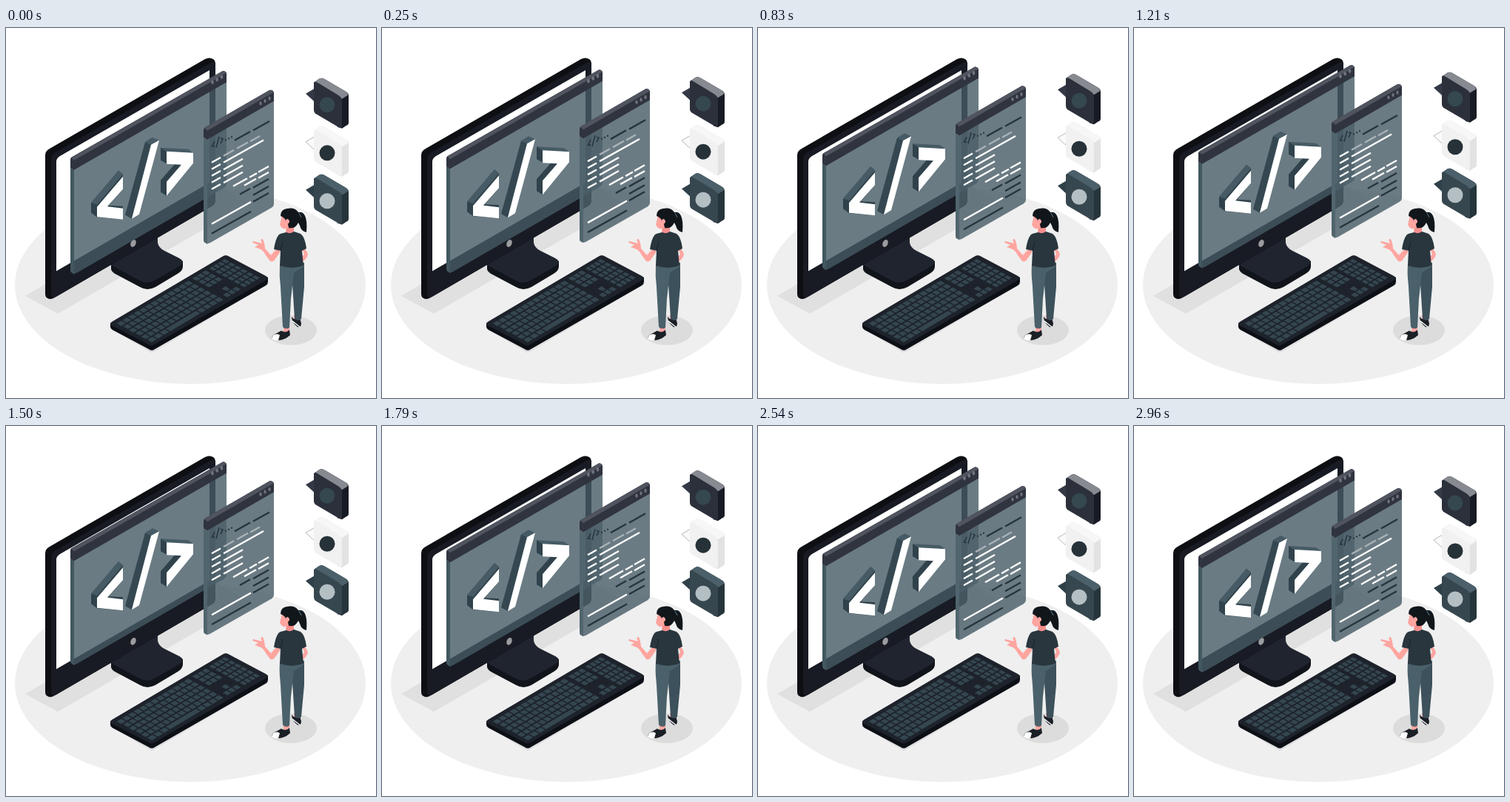
An HTML page that plays this animation: 500x500 px, repeating every 3 s.

```html
<!DOCTYPE html>
<html lang="en">
<head>
<meta charset="utf-8">
<title>Isometric workstation</title>
<style>
  html, body { margin: 0; width: 100%; height: 100%; overflow: hidden; background: #fff; }
  svg { display: block; width: 100vw; height: 100vh; }
  .line { fill: none; stroke-linecap: butt; }
</style>
</head>
<body>
<svg viewBox="0 0 500 500">
  <!-- floor and shadows -->
  <ellipse cx="249" cy="347.5" rx="237" ry="133.5" fill="#efefef"/>
  <path d="M26 362 70 386 328 237 284 212Z" fill="#e0e0e0"/>
  <ellipse cx="385" cy="408.5" rx="35" ry="20" fill="#dcdcdc"/>

  <!-- stand -->
  <path d="M142 318V326Q143 330 149 333L181 350Q191 356 202 350L232 332Q239 328 239 322V315L190 300Z" fill="#11141b"/>
  <path d="M145 314 170 299 205 279V290Q206 297 214 301L234 311Q243 316 234 322L201 341Q191 347 180 341L147 323Q139 319 145 314Z" fill="#20242f"/>

  <!-- monitor -->
  <path d="M53 172Q53 166 59 163L269 42Q275 39 280 42 283 44 283 49V233Q283 238 278 241L66 364Q60 368 56 365 53 364 53 359Z" fill="#0d0f13"/>
  <path d="M61 177Q61 171 67 168L276 47Q283 43 283 51V233Q283 238 278 241L68 363Q61 367 61 359Z" fill="#181b23"/>
  <path d="M68 181Q68 176 73 173L275 57V209L68 328.500Z" fill="#fff"/>
  <ellipse cx="172" cy="291" rx="3.500" ry="5.200" transform="rotate(22 172 291)" fill="#9a9c9f"/>

  <!-- keyboard -->
  <path d="M143 407 197 439 355 346 350 336Z" fill="#dedede"/>
  <path d="M141 399V404Q141 406 144 408L193 434Q197 437 201 434L351 348Q354 346 354 343V337L297 320Z" fill="#0d1016"/>
  <path d="M143 397 293 308.500Q297 306 301 308.500L351 335Q356 338 351 341L201 427.500Q197 430 193 428L143 402Q139 400 143 397Z" fill="#1d222b"/>
  <g id="keys" transform="matrix(156 -93 56 30 141 400)" fill="#34464f"/>

  <!-- person -->
  <g>
    <path d="M375 400H383V411H375ZM389 388H398V396H389Z" fill="#ffa5a0"/>
    <path d="M386 390Q390 396 397 392L399 399Q399 405 394 404 386 398 386 390Z" fill="#1b2026"/>
    <path d="M387 396 397 404" stroke="#fff" stroke-width="1.500"/>
    <path d="M372 409Q378 413 383 408L384 415Q380 419 374 421 368 423 361 421 358 419 361 415Z" fill="#1b2026"/>
    <path d="M361 415Q367 412 370 415L368 422Q362 423 359 420Z" fill="#fff"/>
    <path d="M385 325 387 346 390 393Q395 397 399 393L403 350V317Z" fill="#3c515b"/>
    <path d="M370 319Q369 335 371 350L374 404Q378 408 383 405L385 366 389 331 403 322V317Z" fill="#4a616b"/>
    <path d="M399 295Q407 300 408 306 407 311 402 315L398 311 403 306Z" fill="#ffa5a0"/>
    <path d="M366 298 358 307 350 298Q350 293 347 285L344 286 346 291 334 288 333 290 341 293 336 296 344 299Q348 301 351 307L357 315Q361 317 364 312L371 302Z" fill="#ffa5a0"/>
    <path d="M379 267H389V277Q384 281 378 277Z" fill="#f58f8d"/>
    <path d="M379 276Q384 279 389 275L398 278Q404 282 406 298L400 301 402 321Q386 327 370 321L371 301Q366 300 362 299 365 280 371 278Z" fill="#29363e"/>
    <path d="M371 301 374 288" stroke="#19242b" stroke-width="1" class="line"/>
    <path d="M373 253 370 266 372 269 374 271Q380 272 385 267L387 252Z" fill="#ffa5a0"/>
    <path d="M371 254Q371 245 380 244 390 242 395 249L399 249Q408 252 406 276 399 275 397 267L395 263Q391 272 382 270L381 265Q384 261 381 258 378 258 378 261 378 257 371 254Z" fill="#11161b"/>
    <path d="M396 250 399 256" stroke="#455a64" stroke-width="1.500"/>
    <circle cx="380.500" cy="261.500" r="2.500" fill="#ffa5a0"/>
  </g>

  <g id="floating">
    <!-- large panel -->
    <g>
      <path d="M91 178 298 61V211Q298 214 295 216L96 331 91 333Z" fill="#455a64" opacity=".8"/>
      <path d="M87 189 92 191V333L89 331Q87 330 87 328Z" fill="#435760"/>
      <path d="M87 178Q87 175 90 174L293 58.300Q296 57.500 298 61V73.500L92 192 87 189Z" fill="#30343f"/>
      <path d="M88 175.500 293 58.300Q296 58 298 61L92 179Z" fill="#50545f"/>
      <g class="dots" fill="#70747e">
        <ellipse cx="279" cy="73.500" rx="1.800" ry="2.800"/><ellipse cx="285.200" cy="70" rx="1.800" ry="2.800"/><ellipse cx="291.500" cy="66.500" rx="1.800" ry="2.800"/>
      </g>
      <path d="M152 193 158 198V218L139 240 158 241V259L123 256 115 250V237Z" fill="#30424b"/>
      <path d="M152 193 158 198 123 239 115 236Z" fill="#465b65"/>
      <path d="M158 201 123 242V255.500L158 259V244L137 241.500 158 218Z" fill="#fff"/>
      <path d="M188 154 197 158 170 258 161 253Z" fill="#354851"/>
      <path d="M188 154 198 148 207 152 196 158Z" fill="#465b65"/>
      <path d="M196 158 207 152 180 252 170 258Z" fill="#fff"/>
      <path d="M209 162 218 167V184L209 179ZM209 206 229 183 237 185 217 209V227L209 222Z" fill="#30424b"/>
      <path d="M209 162 246 164 253 169 218 168Z" fill="#465b65"/>
      <path d="M217 167 253 169V183L217 227V208L237 185 217 184Z" fill="#fff"/>
    </g>

    <!-- code window -->
    <g>
      <path d="M271 139 362 87V238Q362 241 359 243L275 291 271 292Z" fill="#4d616a" opacity=".83"/>
      <path d="M267 149 272 151V292L269 290.500Q267 290 267 287Z" fill="#51656e"/>
      <path d="M267 138Q267 135.500 270 134L356 84.300Q360 83 362 87V99L272 151 267 148Z" fill="#30343f"/>
      <path d="M268 135 356 84.300Q360 83 362 87L272 139Z" fill="#50545f"/>
      <g fill="#70747e">
        <ellipse cx="344" cy="102" rx="1.600" ry="2.600"/><ellipse cx="350" cy="98.700" rx="1.600" ry="2.600"/><ellipse cx="356" cy="95.300" rx="1.600" ry="2.600"/>
      </g>
      <path d="M282 153 278.500 160 282 160M288 147 284 162M290 149 293 150 290 156" class="line" stroke="#26343c" stroke-width="1.500"/>
      <path d="M297 152.500V150.500M301 150.500V148.500M305 148.500V146.500" class="line" stroke="#26343c" stroke-width="2"/>
      <g id="code" class="line" stroke-width="2.300"/>
    </g>
    <g id="badges"/>
  </g>
</svg>
<script>
const NS = "http://www.w3.org/2000/svg";
const byId = id => document.getElementById(id);

function add(parent, tag, attrs) {
  const node = parent.appendChild(document.createElementNS(NS, tag));
  for (const name in attrs) node.setAttribute(name, attrs[name]);
  return node;
}

function keyRow(row, start, end, count) {
  const step = (end - start) / count;
  for (let i = 0; i < count; i++) {
    add(byId("keys"), "rect", {
      x: start + i * step, y: 0.07 + row * 0.147, width: step - 0.009, height: 0.112
    });
  }
}

for (let row = 0; row < 6; row++) {
  if (row === 5) {
    keyRow(row, 0.03, 0.19, 3);
    keyRow(row, 0.19, 0.46, 1);
    keyRow(row, 0.46, 0.66, 4);
  } else {
    keyRow(row, 0.03 + (row % 2) * 0.004, 0.66, row ? 14 : 13);
  }
  if (row < 3 || row === 5) keyRow(row, 0.685, 0.81, 3);
  if (row === 4) keyRow(row, 0.727, 0.769, 1);
  keyRow(row, 0.83, 0.975, 4);
}

// Each code line rises along the isometric axis: [x1, y1, x2].
function codeLines(color, lines) {
  for (const [x1, y1, x2] of lines) {
    add(byId("code"), "path", { d: `M${x1} ${y1}L${x2} ${y1 - (x2 - x1) * 0.56}`, stroke: color });
  }
}
codeLines("#26343c", [[309, 152, 330], [334, 138.5, 356], [316, 225, 330], [334, 216, 355],
  [334, 226, 355], [334, 235, 355], [278, 278, 331]]);
codeLines("#aab3b7", [[294, 173, 308], [312, 163, 327], [330, 153.500, 343]]);
codeLines("#fff", [[278, 182, 290], [278, 191, 290], [278, 200, 290], [278, 209, 290], [278, 218, 290],
  [294, 182, 348], [294, 191.500, 320], [294, 200.500, 320], [294, 209.500, 320],
  [307, 214, 326], [329, 202, 339], [341, 195, 355], [322, 213, 338], [341, 203, 355], [278, 265, 331]]);

function badge(y, front, top, side, tail, mark, edge) {
  const g = add(byId("badges"), "g", { transform: `translate(0 ${y})` });
  add(g, "path", { d: "M405 21 417 14V32Z", fill: tail, stroke: edge, "stroke-width": 0.7 });
  add(g, "path", { d: "M416 9V6L423 1Q426-1 430 1L459 18Q463 20 463 24V60Q463 63 460 64L454 68 448 66Z", fill: side });
  add(g, "path", { d: "M417 5 423 1Q426-1 430 1L459 18Q462 20 462 23L454 28 449 24Z", fill: top });
  add(g, "path", { d: "M416 8Q416 3 421 6L449 23Q454 26 454 31V64Q454 69 449 66L420 49Q416 47 416 43Z", fill: front });
  add(g, "circle", { cx: 434, cy: 36, r: 10.500, fill: mark });
}
badge(68, "#2b303b", "#888a92", "#171b24", "#343946", "#35474f", "none");
badge(133, "#f1f1f1", "#f7f7f7", "#e2e2e2", "#fafafa", "#263238", "#999");
badge(198, "#37474f", "#4b606a", "#26343b", "#2f4049", "#b4bfc4", "none");

const LOOP = 3000, LIFT = 10, LEAD = 30;

// Constant-speed rise and fall.
function render(time) {
  const phase = ((time + LEAD) % LOOP) / LOOP;
  const y = -LIFT * (1 - Math.abs(1 - 2 * phase));
  byId("floating").setAttribute("transform", `translate(0 ${y.toFixed(3)})`);
}

const start = performance.now();
function tick() {
  render(performance.now() - start);
  requestAnimationFrame(tick);
}
tick();
</script>
</body>
</html>
```
